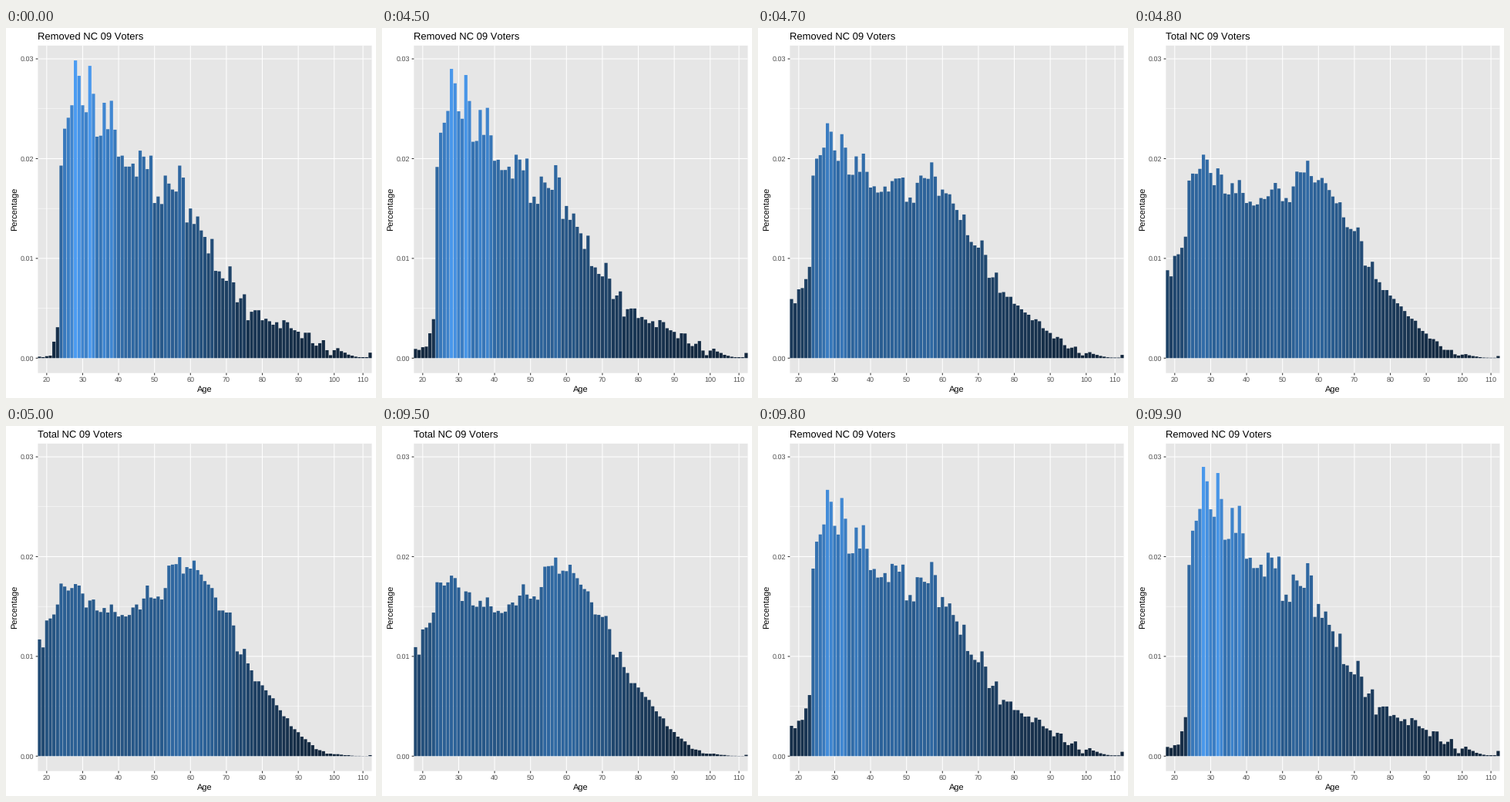
Recreate the animation shown at these times as a matplotlib script. Size 480 px wide and 480 px high, loop 10000 ms.

```python
import numpy as np
import matplotlib.pyplot as plt
from matplotlib.animation import FuncAnimation
from matplotlib.patches import Rectangle

plt.rcParams["font.family"] = "Liberation Sans"
plt.rcParams["text.hinting"] = "none"
plt.rcParams["text.hinting_factor"] = 1

SIZE, DPI = 480, 96
PT = 72 / DPI                       # points per pixel
LEFT, RIGHT, TOP, BOTTOM = 41.4, 474.5, 22.8, 447.6
BASE = 428.3                        # pixel row of zero
UNIT = 1.2942                       # pixels per 0.0001
PEAK = 298.4
HOLD, MOVE = 45, 5                  # frames resting and moving

# shares in units of 0.0001, one per age from 18 up
REMOVED = np.array([
    1.5, 1, 2, 2.5, 16.5, 31, 193, 230, 241, 253.5,
    298.4, 283, 253.5, 246.5, 293, 265, 222, 223, 256, 229.5,
    258, 229, 202, 203, 192, 192, 195, 182, 208, 202,
    189.5, 203, 155.5, 162, 154.5, 183, 175, 169, 167, 193,
    181, 136, 150, 134.5, 142, 128, 121.5, 105, 119.5, 87.5,
    87, 80, 77.5, 92, 76, 56, 60, 64, 38, 46.5,
    48, 48, 38, 39.5, 37, 33.5, 36, 30, 38, 36,
    30, 28, 26.5, 20, 25.5, 25.5, 15, 12.5, 15, 18,
    8, 3, 8, 10, 7, 5.5, 3.5, 2.5, 1.5, 1, 1, 1, 5.5])
TOTAL = np.array([
    117, 109, 136, 138, 142, 152, 173, 170, 166, 168.5,
    172.5, 171, 163, 149, 156, 157, 146, 144.5, 148.5, 144,
    152, 144.5, 140, 141.5, 140, 141.5, 149, 152, 147, 158,
    171, 159, 158, 160, 157, 168.5, 191, 192, 192.5, 199.5,
    183, 189.5, 188, 196, 186.5, 182, 175.5, 172, 168.5, 159,
    146, 146, 144, 144, 131, 105, 102, 107.5, 93, 86,
    75, 75, 71, 66, 61, 58, 51, 46, 40, 38,
    30, 27, 24, 19.5, 17, 14, 11, 7, 6, 5,
    2.5, 2.5, 2, 2, 1.5, 1, 1, 0.5, 0.3, 0.3, 0.2, 0.2, 1])

STEP = (RIGHT - LEFT) / (len(REMOVED) - 0.1)
LEVELS = [0, 0.5, 0.67, 1]
BLUES = np.array([(18, 37, 58), (39, 87, 135), (48, 106, 165), (75, 156, 242)]) / 255


def slot(i):
    return LEFT + (i + 0.45) * STEP


def row(value):
    return BASE - value * UNIT


def shade(values):
    return np.column_stack([np.interp(values / PEAK, LEVELS, c) for c in BLUES.T])


fig = plt.figure(figsize=(SIZE / DPI, SIZE / DPI), dpi=DPI, facecolor="white")
ax = fig.add_axes([0, 0, 1, 1])
ax.set_xlim(0, SIZE)
ax.set_ylim(SIZE, 0)
ax.set_autoscale_on(False)
ax.axis("off")


def line(xs, ys, color, width):
    ax.plot(xs, ys, color=color, lw=width * PT, solid_capstyle="butt", snap=False, zorder=1)


def label(x, y, text, size, color="black", **kw):
    return ax.text(x, y, text, fontsize=size * PT, color=color, va="baseline", **kw)


ax.add_patch(Rectangle((LEFT, TOP), RIGHT - LEFT, BOTTOM - TOP,
                       fc="#e6e6e6", lw=0, snap=False, zorder=0))

for v in (50, 150, 250):
    line([LEFT, RIGHT], [row(v)] * 2, "white", 0.53)
for v in (0, 100, 200, 300):
    y = row(v)
    line([LEFT, RIGHT], [y, y], "white", 1.07)
    line([LEFT - 2.75, LEFT], [y, y], "#333333", 1.07)
    label(LEFT - 4.95, y + 3.2, f"{v / 1e4:.2f}", 8.8, "#4d4d4d", ha="right")

# two ages between 100 and 110 have no bar
for age in range(20, 111, 10):
    x = slot(age - 18 - (2 if age > 100 else 0))
    line([x, x], [TOP, BOTTOM], "white", 1.07)
    line([x, x], [BOTTOM, BOTTOM + 2.75], "#333333", 1.07)
    label(x, 458.9, str(age), 8.8, "#4d4d4d", ha="center")

label((LEFT + RIGHT) / 2, 472.2, "Age", 11, ha="center")
label(13.4, (TOP + BOTTOM) / 2, "Percentage", 11, ha="center",
      rotation=90, rotation_mode="anchor")
title = label(LEFT - 0.4, 15, "", 13.2, ha="left")

bars = ax.bar(slot(np.arange(len(REMOVED))), -REMOVED * UNIT, 0.9 * STEP,
              bottom=BASE, lw=0, snap=False, zorder=2)


def draw(frame):
    half, k = divmod(frame, HOLD + MOVE)
    t = max(0, k - HOLD + 1) / (MOVE + 1)
    ease = (1 - np.cos(np.pi * t)) / 2
    start, end = (TOTAL, REMOVED) if half else (REMOVED, TOTAL)
    values = start + (end - start) * ease
    for bar, v, color in zip(bars, values, shade(values)):
        bar.set_height(-v * UNIT)
        bar.set_facecolor(color)
    removed = (half == 0) == (k < HOLD + 3)
    title.set_text(("Removed" if removed else "Total") + " NC 09 Voters")
    return [*bars, title]


anim = FuncAnimation(fig, draw, frames=2 * (HOLD + MOVE), interval=100,
                     repeat=True, repeat_delay=0, blit=False)
plt.show()
```
